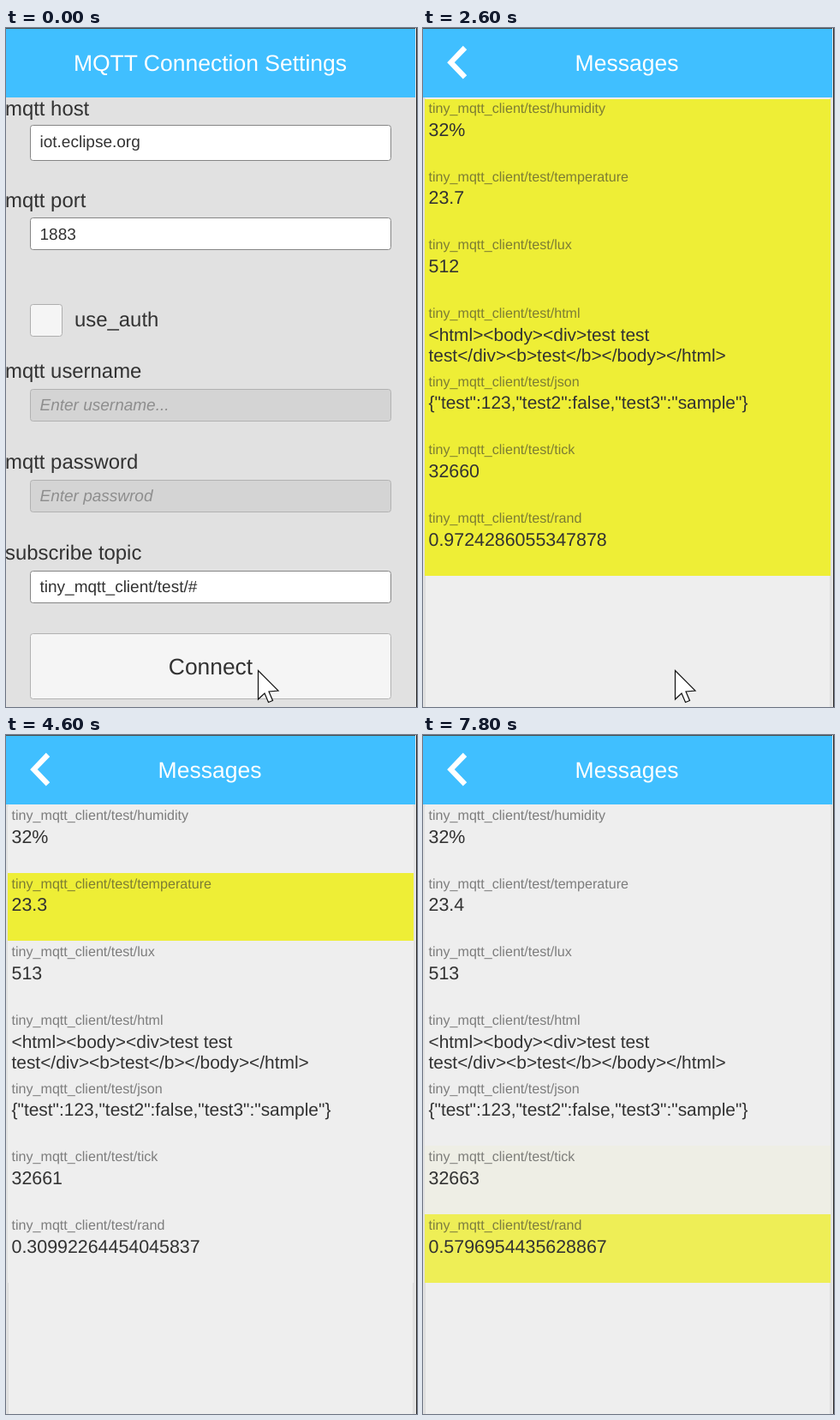
An HTML page for the animation above (8 s loop, 480 px wide and 792 px high).

```html
<!DOCTYPE html>
<html lang="en">
<head>
<meta charset="utf-8">
<title>MQTT client</title>
<style>
  html, body { margin: 0; width: 100%; height: 100%; overflow: hidden; background: #e1e1e1; }
  svg { display: block; width: 480px; height: 792px; }
  text {
    font-family: "Liberation Sans", Arial, sans-serif;
    fill: #323232; white-space: pre; text-rendering: geometricPrecision;
  }
  .title { font-size: 26.5px; fill: #fff; text-anchor: middle; }
  .label { font-size: 23.9px; }
  .field { font-size: 19px; }
  .hint { font-size: 19px; font-style: italic; fill: #8e8e8e; }
  .button { font-size: 26.4px; text-anchor: middle; }
  .topic { font-size: 16.1px; fill-opacity: .6; }
  .value { font-size: 21.4px; }
  .markup { font-size: 20.9px; }
</style>
</head>
<body>
<svg id="stage" viewBox="0 0 480 792"></svg>
<script>
const LOOP = 8000, STEP = 200, FADE = 630;
const ROW_TOP = 81.4, ROW_H = 79.67;
const stage = document.getElementById('stage');

function add(parent, tag, attrs, content) {
  const el = document.createElementNS('http://www.w3.org/2000/svg', tag);
  for (const key in attrs) el.setAttribute(key, attrs[key]);
  if (content !== undefined) el.textContent = content;
  parent.appendChild(el);
  return el;
}
const rect = (p, x, y, width, height, fill) => add(p, 'rect', { x, y, width, height, fill });
const text = (p, cls, x, y, s) => add(p, 'text', { class: cls, x, y }, s);
const box = (p, y, height, fill, stroke, width = 421) =>
  add(p, 'rect', { x: 28.5, y: y + .5, width, height, rx: 3, fill, stroke });
const show = (el, on) => el.setAttribute('visibility', on ? 'visible' : 'hidden');

rect(stage, 0, 0, 480, 792, '#e1e1e1');
rect(stage, 0, 0, 478, 81, '#40bfff');

// Settings page
const settings = add(stage, 'g', {});
text(settings, 'title', 238.5, 50, 'MQTT Connection Settings');
[['mqtt host', 102], ['mqtt port', 209], ['mqtt username', 408],
 ['mqtt password', 514], ['subscribe topic', 620]]
  .forEach(([s, y]) => text(settings, 'label', -1, y, s));
[[113, 41, 'iot.eclipse.org', 139], [221, 37, '1883', 247], [633, 37, 'tiny_mqtt_client/test/#', 658]]
  .forEach(([y, h, s, base]) => {
    box(settings, y, h, '#fff', '#858585');
    text(settings, 'field', 39.5, base, s);
  });
[[421, 'Enter username...', 446], [527, 'Enter passwrod', 552]]
  .forEach(([y, s, base]) => {
    box(settings, y, 37, '#d4d4d4', '#b2b2b2');
    text(settings, 'hint', 39.5, base, s);
  });
box(settings, 322, 37, '#f5f5f5', '#aeaeae', 37);
text(settings, 'label', 80, 348, 'use_auth');
const button = box(settings, 706, 76, '#f5f5f5', '#b2b2b2');
text(settings, 'button', 239, 754, 'Connect');

// Messages page
const messages = add(stage, 'g', {});
text(messages, 'title', 238, 50, 'Messages');
add(messages, 'path', { d: 'M49 23L32.5 40.2L49 57.4', fill: 'none', stroke: '#fff', 'stroke-width': 6.2 });
rect(messages, 2, 81, 474, 711, '#eee');
rect(messages, 2, 82, 1, 710, '#dcdcdc');
rect(messages, 475, 82, 1, 710, '#dcdcdc');
const list = add(messages, 'g', {});
const topics = ['humidity', 'temperature', 'lux', 'html', 'json', 'tick', 'rand'];
const rows = topics.map((name, i) => {
  const top = ROW_TOP + ROW_H * i;
  const y = i ? Math.floor(top) : 83;
  const back = rect(list, 2, y, 474, Math.floor(top + ROW_H) - y, '#eee');
  text(list, 'topic', 6.5, top + 17.6, 'tiny_mqtt_client/test/' + name);
  const cls = name === 'html' || name === 'json' ? 'markup' : 'value';
  const lines = [0, 1].map(k => text(list, cls, 6.5, top + 44.1 + 24 * k, ''));
  return { back, lines };
});

const cursor = add(stage, 'path', {
  d: 'M294.5 749.5V783L302 776L306.5 786.5L311.5 784.5L307 774L318 773Z',
  fill: '#fff', stroke: '#111', 'stroke-width': 1.2
});
rect(stage, 0, 0, 480, 1, '#4c4c4c');
rect(stage, 478, 0, 1, 792, '#e8e8e8');
rect(stage, 479, 0, 1, 792, '#262626');

// Arrivals: time, row, value, fade length, time held at full colour
const first = ['32%', '23.7', '512',
  '<html><body><div>test test\ntest</div><b>test</b></body></html>',
  '{"test":123,"test2":false,"test3":"sample"}', '32660', '0.9724286055347878'];
const arrivals = first.map((s, i) => [2200, i, s, 600, 400]).concat([
  [3400, 5, '32661'],
  [3600, 6, '0.30992264454045837'],
  [4000, 2, '513', 600],
  [4600, 1, '23.3', 600],
  [5000, 5, '32662', 600],
  [5200, 6, '0.12630206891567242', 400],
  [6200, 5, '32663', FADE, 180],
  [6200, 6, '0.8369081687616913', FADE, 180],
  [6800, 1, '23.4', 600],
  [7200, 5, '32663'],
  [7690, 6, '0.5796954435628867']
]);

function drawRow(row, i, t) {
  const last = arrivals.filter(a => a[1] === i && a[0] <= t).pop();
  if (!last) return;
  const [start, , value, fade = FADE, hold = 0] = last;
  const k = Math.min(1, Math.max(0, (t - start - hold) / fade));
  row.back.setAttribute('fill', `rgb(238,238,${Math.round(54 + 184 * k)})`);
  const parts = value.split('\n');
  row.lines.forEach((el, n) => { el.textContent = parts[n] || ''; });
}

let shown = -1;
function draw(now) {
  const t = Math.floor(now % LOOP / STEP) * STEP;
  if (t !== shown) {
    shown = t;
    show(settings, t < 1800);
    show(messages, t >= 1800);
    show(list, t >= 2200);
    show(cursor, t < 3400);
    button.setAttribute('fill', t < 1400 ? '#f5f5f5' : '#c0c0c0');
    button.setAttribute('stroke', t < 1400 ? '#b2b2b2' : '#8c8c8c');
    rows.forEach((row, i) => drawRow(row, i, t));
  }
}
const origin = performance.now();
function tick() {
  draw(performance.now() - origin);
  requestAnimationFrame(tick);
}
tick();
</script>
</body>
</html>
```
